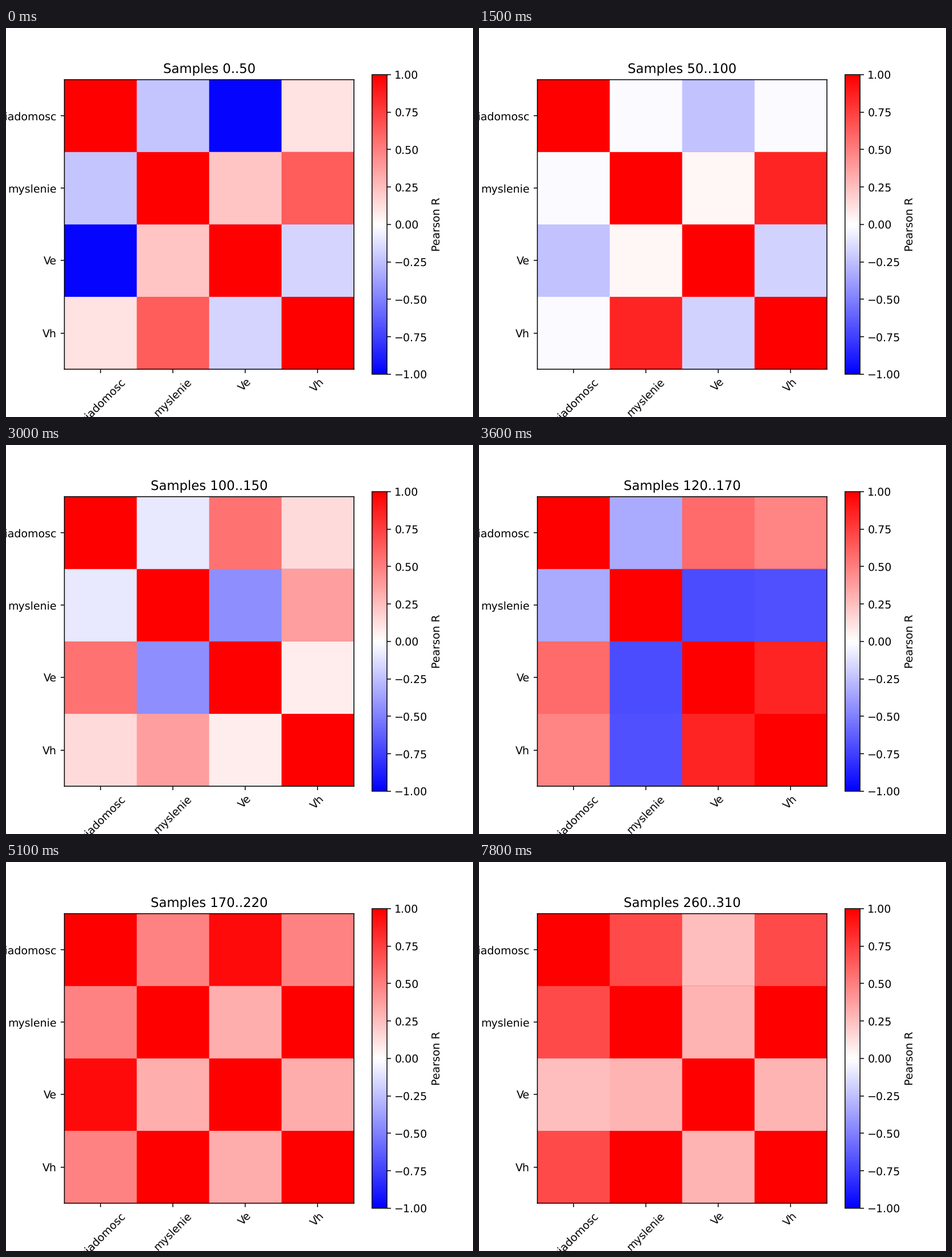
Write a matplotlib script that moves like this. It is 820x683 px and loops after 8000 ms.

```python
import numpy as np
import matplotlib.pyplot as plt
from matplotlib.animation import FuncAnimation
from matplotlib.patches import Rectangle

WIDTH, HEIGHT, DPI = 820, 683, 136.64
INTERVAL = 100        # ms per tick
TICKS_PER_STEP = 3    # the sample window moves every 300 ms
TICKS = 80
WINDOW, STRIDE = 50, 10

LABELS = ["swiadomosc", "myslenie", "Ve", "Vh"]
SIZE = len(LABELS)


def chain(link, other, partial):
    """Correlation reached through a linked signal, plus its own partial part."""
    return link * other + np.sqrt(max(0, 1 - link ** 2)) * partial


def correlation(step):
    """Symmetric correlation matrix for one window position."""
    # Ve follows swiadomosc and Vh follows myslenie, each with varying strength
    s_ve = np.interp(step, [3, 7, 12, 17, 22, 26],
                     [-0.98, 0.5, 0.585, 0.96, 1, 0.25])
    m_vh = min(1, 0.64 + 0.043 * step) - 1.685 * np.exp(-((step - 12) / 2) ** 2)
    s_m = np.interp(step, [0, 3, 7, 12, 17, 22, 26],
                    [-0.23, -0.31, 0.27, -0.335, 0.49, 0.845, 0.71])

    s_part = 0.34 * np.cos(np.pi * step / 12) ** 4
    m_part = -0.28 - 0.4 * np.cos(np.pi * (step - 14) / 11.5)
    ve_part = chain(s_ve, s_part, 0.4 * np.tanh(step - 9.5))

    s_vh = chain(m_vh, s_m, s_part)
    m_ve = chain(s_ve, s_m, m_part)
    ve_vh = chain(m_vh, m_ve, ve_part)

    upper = np.zeros((SIZE, SIZE))
    upper[np.triu_indices(SIZE, 1)] = s_m, s_ve, s_vh, m_ve, m_vh, ve_vh
    return upper + upper.T + np.eye(SIZE)


plt.rcParams.update({
    "font.family": "DejaVu Sans",
    "text.hinting": "no_hinting",
    "path.snap": False,
})
# The small margin keeps the pixel size from being truncated by rounding
fig, ax = plt.subplots(
    figsize=((WIDTH + 0.01) / DPI, (HEIGHT + 0.01) / DPI), dpi=DPI)
ax.set(xlim=(-0.5, SIZE - 0.5), ylim=(SIZE - 0.5, -0.5), aspect="equal")
ax.set_xticks(range(SIZE), LABELS, rotation=45)
ax.set_yticks(range(SIZE), LABELS)
title = ax.set_title("")

scale = plt.cm.ScalarMappable(plt.Normalize(-1, 1), "bwr")
fig.colorbar(scale, ax=ax, label="Pearson R")

# Each cell runs on under its later neighbours, so no seams show
cells = [ax.add_patch(Rectangle((col - 0.5, row - 0.5), SIZE - col, SIZE - row,
                                linewidth=0))
         for row in range(SIZE) for col in range(SIZE)]


def update(tick):
    step = tick // TICKS_PER_STEP
    start = step * STRIDE
    for cell, value in zip(cells, correlation(step).flat):
        cell.set_facecolor(scale.to_rgba(value))
    title.set_text(f"Samples {start}..{start + WINDOW}")
    return [*cells, title]


anim = FuncAnimation(fig, update, frames=TICKS, interval=INTERVAL,
                     repeat=True, repeat_delay=0, blit=False)
plt.show()
```
